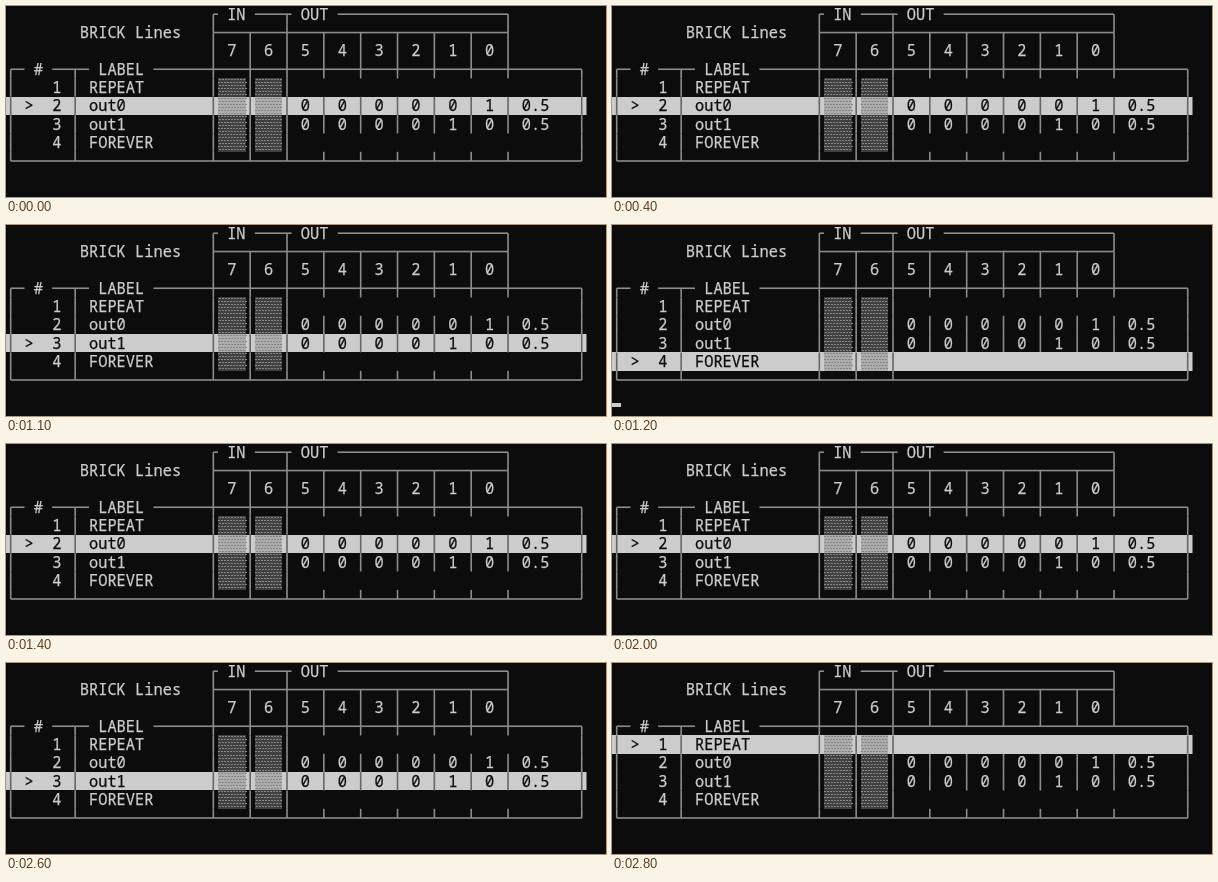
Recreate the animation shown at these times as an HTML page with a canvas. Size 600 px wide and 191 px high, loop 2.9 s.

```html
<!DOCTYPE html>
<html lang="en">
<head>
<meta charset="utf-8">
<title>BRICK Lines</title>
<style>
html, body { margin: 0; width: 100%; height: 100%; overflow: hidden; background: #0c0c0c; }
canvas { display: block; }
</style>
</head>
<body>
<canvas id="stage" width="600" height="191"></canvas>
<script>
const ctx = document.getElementById("stage").getContext("2d");
const CELL = 9.21, ROW = 18.35;
const INK = "#cccccc", PAPER = "#0c0c0c", RULE = "#8c8c8c", RULE_LIT = "#666666";
const RULE_WIDTH = 1.6;
const LOOP = 2900;

// Each step holds its program line until the given time.
const STEPS = [
  [600, 2], [1200, 3], [1300, 4], [1400, 1],
  [2100, 2], [2700, 3], [2800, 4], [2900, 1]
];
const LINES = [
  { label: "REPEAT" },
  { label: "out0", bits: "000001", wait: "0.5" },
  { label: "out1", bits: "000010", wait: "0.5" },
  { label: "FOREVER" }
];
const BIT_COLS = [34, 38, 42, 46, 50, 54];
const BODY_COLS = [0, 7, 22, 26, 30, 62];

const colX = col => 4.7 + CELL * col;
const rowY = row => 8.2 + ROW * row;

function text(str, col, row, color = INK) {
  const y = Math.round(rowY(row) + 5.3);
  ctx.fillStyle = ctx.strokeStyle = color;
  [...str].forEach((ch, i) => {
    ctx.fillText(ch, colX(col + i), y);
    ctx.strokeText(ch, colX(col + i), y);
  });
}

function across(from, to, row) {
  ctx.fillStyle = RULE;
  ctx.fillRect(colX(from), rowY(row) - RULE_WIDTH / 2, colX(to) - colX(from), RULE_WIDTH);
}

function down(col, from, to, color = RULE) {
  const y = rowY(from);
  ctx.fillStyle = color;
  ctx.fillRect(colX(col) - RULE_WIDTH / 2, y, RULE_WIDTH, rowY(to) - y);
}

function shade(col, row, lit) {
  const left = Math.round(colX(col - 0.5)), right = Math.round(colX(col + 2.5));
  const top = Math.round(rowY(row - 0.5)), bottom = Math.round(rowY(row + 0.5));
  ctx.fillStyle = lit ? "#acacac" : "#404040";
  ctx.fillRect(left, top, right - left, bottom - top);
  ctx.fillStyle = "#868686";
  for (let y = top + 1; y < bottom; y += 3) {
    for (let x = left + (y % 2); x < right; x += 3) ctx.fillRect(x, y, 2, 1);
  }
}

function header() {
  text("IN", 24, 0);
  text("OUT", 32, 0);
  text("BRICK Lines", 8, 1);
  text("#", 3, 3);
  text("LABEL", 10, 3);
  [..."76543210"].forEach((digit, i) => text(digit, 24 + 4 * i, 2));

  across(22, 22.5, 0);
  across(26.5, 30.5, 0);
  across(35.5, 54, 0);
  across(22, 54, 1);
  across(0, 1.5, 3);
  across(4.5, 8.5, 3);
  across(15.5, 62, 3);
  [22, 30, 54].forEach(c => down(c, 0, 1));
  [22, 26, 30, ...BIT_COLS].forEach(c => down(c, 1, 3));
}

function bodyLine(line, index, active) {
  const row = 3 + index;
  const lit = index === active;
  const color = lit ? PAPER : INK;
  if (lit) {
    const top = Math.round(rowY(row - 0.5));
    ctx.fillStyle = INK;
    ctx.fillRect(0, top, 580.5, Math.round(rowY(row + 0.5)) - top);
    text(">", 2, row, color);
  }
  shade(23, row, lit);
  shade(27, row, lit);
  const cols = line.bits ? BODY_COLS.concat(BIT_COLS) : BODY_COLS;
  cols.forEach(c => down(c, row - 0.5, row + 0.5, lit ? RULE_LIT : RULE));
  text(String(index), 5, row, color);
  text(line.label, 9, row, color);
  if (line.bits) {
    [...line.bits].forEach((bit, i) => text(bit, 32 + 4 * i, row, color));
    text(line.wait, 56, row, color);
  }
}

function draw(now) {
  const t = now % LOOP;
  const active = STEPS.find(([end]) => t < end)[1];
  ctx.fillStyle = PAPER;
  ctx.fillRect(0, 0, 600, 191);
  ctx.font = '15.35px "Noto Sans Mono", "DejaVu Sans Mono", monospace';
  ctx.textAlign = "center";
  ctx.lineWidth = 0.25;

  header();
  BODY_COLS.forEach(c => {
    down(c, 3, 3.5);
    down(c, 7.5, 8);
  });
  BIT_COLS.forEach(c => {
    if (active !== 1) down(c, 3, 3.5);
    if (active !== 4) down(c, 7.5, 8);
  });
  across(0, 62, 8);
  LINES.forEach((line, i) => bodyLine(line, i + 1, active));

  if (active === 4) {
    ctx.fillStyle = INK;
    ctx.fillRect(0, 178, 9, 4);
  }
}

const start = performance.now();
function tick() {
  draw(performance.now() - start);
  requestAnimationFrame(tick);
}
tick();
</script>
</body>
</html>
```
